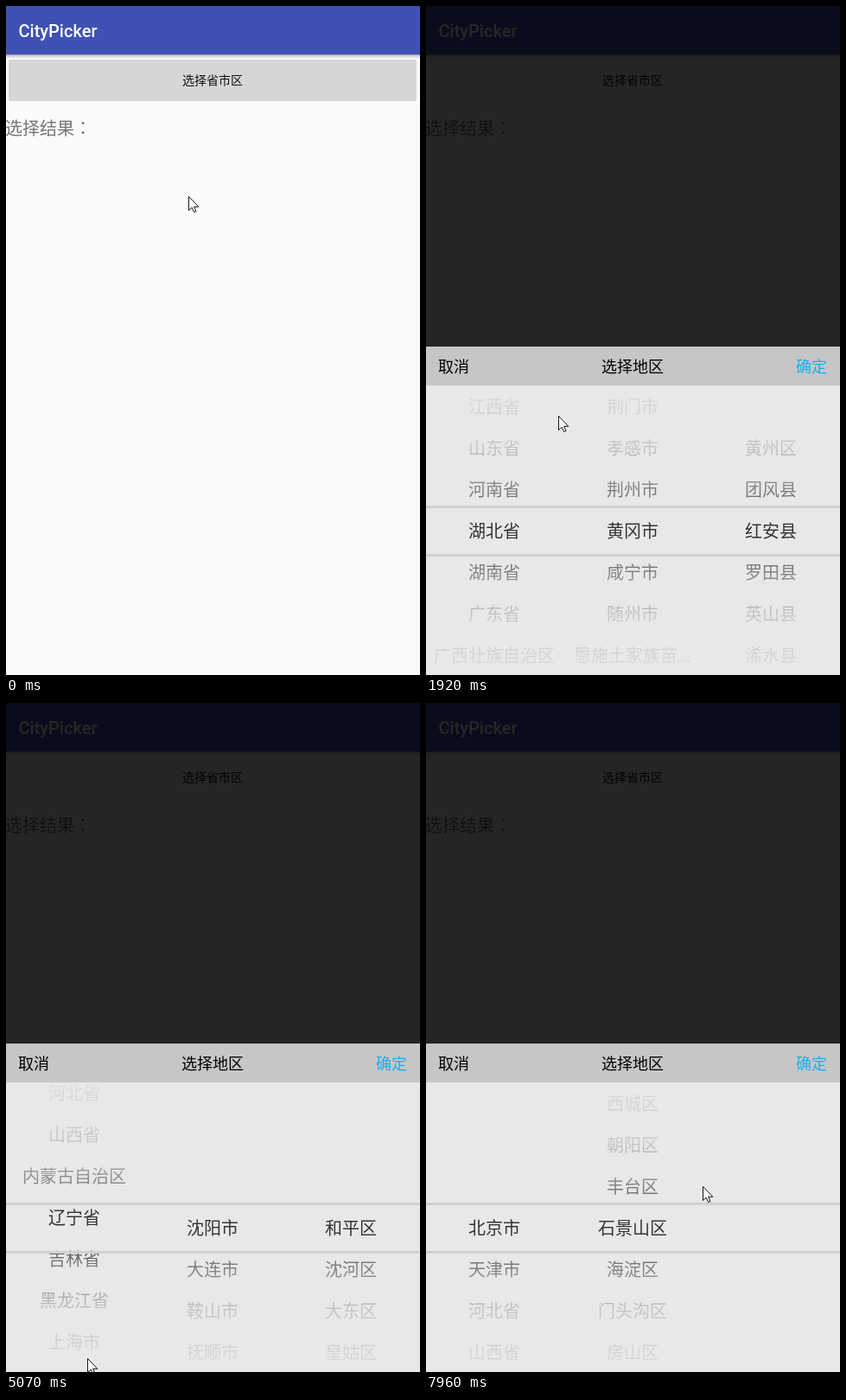
These frames come from a looping animation (479x774 px, 8 s). An HTML page:

```html
<!DOCTYPE html>
<html lang="zh-CN">
<head>
<meta charset="utf-8">
<title>CityPicker</title>
<style>
  html, body { margin: 0; width: 100%; height: 100%; overflow: hidden; background: #fafafa; }
  svg { display: block; width: 479px; height: 774px; }
  text { font: 20px Roboto, "Noto Sans CJK SC", "Noto Sans CJK", sans-serif; }
  .title { font-weight: 500; fill: #fff; }
  .button { font-size: 14px; fill: #111; }
  .result { fill: #757575; }
  .colon { font-family: "Noto Sans CJK TC", "Noto Sans CJK", sans-serif; }
  .bar text { font-size: 18px; fill: #000; }
  .bar .ok { fill: #1aaef0; }
  .wheel text { fill: #333; text-anchor: middle; }
</style>
</head>
<body>
<svg viewBox="0 0 479 774">
  <defs>
    <linearGradient id="drop" x2="0" y2="1">
      <stop offset="0" stop-opacity=".4"/>
      <stop offset=".35" stop-opacity=".16"/>
      <stop offset="1" stop-opacity="0"/>
    </linearGradient>
    <linearGradient id="fade" x2="0" y2="1">
      <stop offset="0" stop-color="#e8e8e8" stop-opacity=".937"/>
      <stop offset=".5" stop-color="#e8e8e8" stop-opacity=".812"/>
      <stop offset="1" stop-color="#e8e8e8" stop-opacity=".247"/>
    </linearGradient>
    <clipPath id="wheelArea"><rect y="439" width="479" height="335"/></clipPath>
  </defs>

  <rect width="479" height="774" fill="#fafafa"/>
  <rect width="479" height="56" fill="#3f51b5"/>
  <rect y="56" width="479" height="5" fill="url(#drop)"/>
  <text class="title" x="14.5" y="36">CityPicker</text>
  <rect id="button" x="3" y="62" width="472" height="48" rx="2"/>
  <text class="button" x="204" y="91.3">选择省市区</text>
  <text class="result" x="-1" y="148.5">选择结果<tspan class="colon" lang="zh-TW">：</tspan></text>

  <g id="dialog">
    <rect width="479" height="774" opacity=".85"/>
    <rect y="394" width="479" height="380" fill="#e8e8e8"/>
    <g class="bar">
      <rect y="394" width="479" height="45" fill="#c6c6c6"/>
      <text x="14" y="424.3">取消</text>
      <text x="203" y="424.3">选择地区</text>
      <text class="ok" x="428" y="424.3">确定</text>
    </g>
    <g clip-path="url(#wheelArea)">
      <g class="wheel"></g>
      <g class="wheel"></g>
      <g class="wheel"></g>
      <rect y="439" width="479" height="144" fill="url(#fade)"/>
      <rect width="479" height="144" fill="url(#fade)" transform="matrix(1 0 0 -1 0 775)"/>
      <path d="M0 578h479v3H0zM0 634h479v3H0z" fill="#d0d0d0"/>
    </g>
  </g>

  <path id="cursor" d="M.5 .5V16.6L4.2 13.2L6.7 18.6L9 17.6L6.6 12.3H11.8Z" fill="#fff" stroke="#111"/>
</svg>

<script>
const LOOP = 8000, ROW = 48, MIDDLE = 607, BASELINE = 7.6;
const COLUMNS = [79, 239, 399];

// province | cities | districts of the selected city
const regions = `
北京市|东城区 西城区 朝阳区 丰台区 石景山区 海淀区 门头沟区 房山区|
天津市|和平区 河东区 河西区 南开区|
河北省|石家庄市 唐山市 秦皇岛市 邯郸市|长安区 桥东区 桥西区 新华区
山西省|太原市 大同市 阳泉市 长治市|小店区 迎泽区 杏花岭区 尖草坪区
内蒙古自治区|呼和浩特市 包头市 乌海市 赤峰市|新城区 回民区 玉泉区 赛罕区
辽宁省|沈阳市 大连市 鞍山市 抚顺市|和平区 沈河区 大东区 皇姑区
吉林省|长春市 吉林市 四平市 辽源市|南关区 宽城区 朝阳区 二道区
黑龙江省|哈尔滨市 齐齐哈尔市 鸡西市 鹤岗市|道里区 南岗区 道外区 平房区
上海市|黄浦区 卢湾区 徐汇区 长宁区|
江苏省|南京市 无锡市 徐州市 常州市|玄武区 白下区 秦淮区 建邺区
浙江省|杭州市 宁波市 温州市 嘉兴市|上城区 下城区 江干区 拱墅区
安徽省|合肥市 芜湖市 蚌埠市 淮南市|瑶海区 庐阳区 蜀山区 包河区
福建省|福州市 厦门市 莆田市 三明市|鼓楼区 台江区 仓山区 马尾区
江西省|南昌市 景德镇市 萍乡市 九江市|东湖区 西湖区 青云谱区 湾里区
山东省|济南市 青岛市 淄博市 枣庄市|历下区 市中区 槐荫区 天桥区
河南省|郑州市 开封市 洛阳市 平顶山市|中原区 二七区 管城回族区 金水区
湖北省|荆门市 孝感市 荆州市 黄冈市 咸宁市 随州市 恩施土家族苗...|黄州区 团风县 红安县 罗田县 英山县 浠水县
湖南省||
广东省||
广西壮族自治区||`.trim().split('\n').map(line => {
  const [province, cities, districts] = line.split('|');
  return { province, cities: cities.split(' '), districts: districts.split(' ') };
});
const provinces = regions.map(r => r.province);
const HUBEI = 16;

// The picture refreshes in bursts: first time, last time, count.
const ticks = [0, ...[
  [150, 850, 6], [1310, 1310, 1], [1620, 1920, 3], [2480, 3450, 8], [3570, 4500, 8],
  [4650, 5620, 8], [5750, 6260, 5], [6540, 7510, 8], [7660, 7660, 1], [7960, 7960, 1],
].flatMap(([from, to, n]) => Array.from({ length: n }, (_, i) =>
  Math.round((from + (to - from) * i / Math.max(n - 1, 1)) / 10) * 10))];

// Keys: time, then one or more values.
const cursorKeys = [
  [0, 211, 220], [290, 215, 200], [850, 163, 91], [1310, 163, 91], [1620, 157, 300],
  [1770, 153, 474], [1920, 153, 474], [2900, 112, 521], [3450, 104, 576],
  [4500, 97, 715], [5070, 94, 758], [5620, 94, 758], [6260, 236, 705],
  [6540, 235, 693], [7370, 240, 575], [7660, 246, 562], [7960, 320, 559],
];
const provinceKeys = [
  [2480, 16], [2900, 16], [3450, 14.854], [3570, 14.3], [4000, 11],
  [4500, 8], [5070, 5.25], [5620, 3.1], [6260, 0],
];
const cityKeys = [[6540, 0], [6820, .8], [7370, 3.1], [7660, 3.85], [7960, 4]];

function sample(keys, t) {
  const next = keys.findIndex(k => k[0] > t);
  if (next < 0) return keys.at(-1).slice(1);
  if (next === 0) return keys[0].slice(1);
  const a = keys[next - 1], b = keys[next];
  const f = (t - a[0]) / (b[0] - a[0]);
  return a.slice(1).map((v, i) => v + (b[i + 1] - v) * f);
}

const byId = id => document.getElementById(id);
const button = byId('button'), dialog = byId('dialog'), cursor = byId('cursor');
const wheels = [...document.querySelectorAll('.wheel')];

function fillWheel(column, names) {
  wheels[column].replaceChildren(...names.map((name, i) => {
    const label = document.createElementNS('http://www.w3.org/2000/svg', 'text');
    label.setAttribute('x', COLUMNS[column]);
    label.setAttribute('y', MIDDLE + BASELINE + i * ROW);
    label.textContent = name;
    return label;
  }));
}

function turnWheel(column, position) {
  wheels[column].setAttribute('transform', `translate(0 ${Math.round(-position * ROW)})`);
}

let shownRegion = -1;

function draw(now) {
  const t = ticks.findLast(tick => tick <= now);
  const open = t >= 1920;
  dialog.style.display = open ? '' : 'none';
  button.setAttribute('fill', open ? '#fafafa' : t === 1310 ? '#bdbebe' : '#d5d7d6');

  const [province] = sample(provinceKeys, t);
  const [city] = sample(cityKeys, t);
  const selected = Math.round(province);
  if (selected !== shownRegion) {
    shownRegion = selected;
    fillWheel(1, regions[selected].cities);
    fillWheel(2, regions[selected].districts);
  }
  turnWheel(0, province);
  turnWheel(1, selected === HUBEI ? 3 : city);
  turnWheel(2, selected === HUBEI ? 2 : 0);

  const [x, y] = sample(cursorKeys, t).map(Math.round);
  cursor.setAttribute('transform', `translate(${x} ${y})`);
}

fillWheel(0, provinces);
const start = performance.now();
function frame() {
  draw((performance.now() - start) % LOOP);
  requestAnimationFrame(frame);
}
frame();
</script>
</body>
</html>
```
